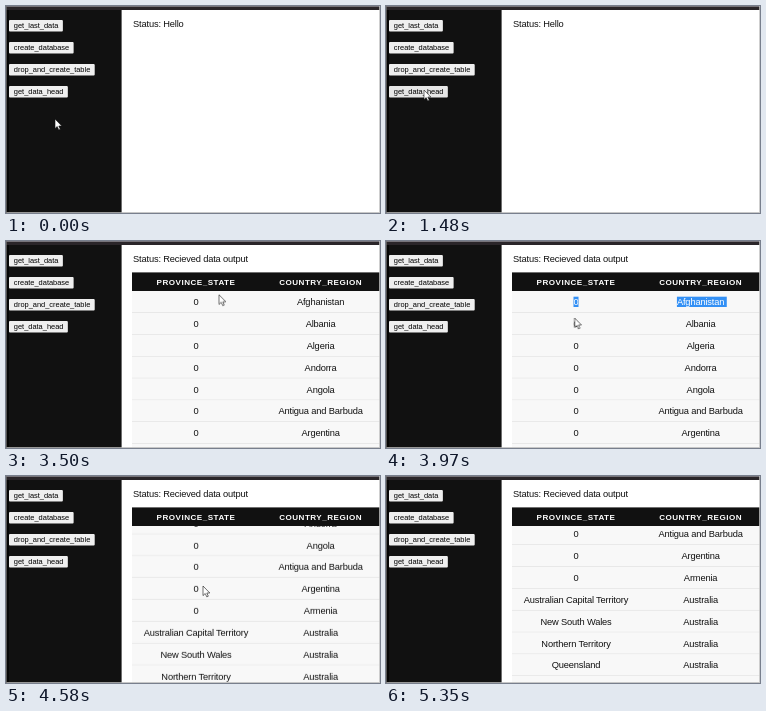
These frames come from a looping animation (374x207 px, 6.43 s). An HTML page:

```html
<!DOCTYPE html>
<html lang="en">
<head>
<meta charset="utf-8">
<title>Data table demo</title>
<style>
  html, body { margin: 0; width: 100%; height: 100%; overflow: hidden; background: #fff; }
  svg { display: block; width: 374px; height: 207px; }
  text { font: 9.3px "Liberation Sans", Arial, sans-serif; letter-spacing: -.16px; fill: #111; }
  .button text { font-size: 7.45px; letter-spacing: 0; fill: #000; }
  .button rect { fill: #efefef; }
  .head text { font-size: 8.1px; font-weight: bold; letter-spacing: .48px; fill: #fff; }
  .mid { text-anchor: middle; }
  .selected rect { fill: #3390f5; }
  .selected text { fill: #fff; }
</style>
</head>
<body>
<svg id="stage" viewBox="0 0 374 207">
  <defs><clipPath id="body"><rect x="126" y="50" width="248" height="157"/></clipPath></defs>
</svg>
<script>
const LOOP = 6430, TICK = 77.5, ROW = 21.83, COLUMNS = [190, 314.6];
const stage = document.getElementById('stage');

function add(parent, tag, attrs = {}, content = '') {
  const el = document.createElementNS('http://www.w3.org/2000/svg', tag);
  for (const key in attrs) el.setAttribute(key, attrs[key]);
  el.textContent = content;
  return parent.appendChild(el);
}
const box = (parent, x, y, width, height, fill = '') =>
  add(parent, 'rect', { x, y, width, height, ...(fill && { fill }) });
const label = (parent, x, y, content, cls = '') =>
  add(parent, 'text', { x, y, class: cls }, content);

// Holds each value until the next time.
function play(el, property, steps) {
  const easing = 'steps(1, end)';
  const frames = steps.map(([t, value]) => ({ offset: t / LOOP, [property]: value, easing }));
  frames.push({ offset: 1, [property]: steps[steps.length - 1][1] });
  el.animate(frames, { duration: LOOP, iterations: Infinity });
}
const show = (el, from) => play(el, 'opacity', [[0, 0], [from, 1]]);
const hide = (el, from) => play(el, 'opacity', [[0, 1], [from, 0]]);

// Samples valueAt(t) once per tick, as a screen recorder would.
function sample(first, last, valueAt) {
  const count = Math.round((last - first) / TICK);
  return Array.from({ length: count + 1 }, (_, i) => {
    const t = first + (last - first) * i / count;
    return [t, valueAt(t)];
  });
}
const progress = (t, start, end) => Math.min(1, Math.max(0, (t - start) / (end - start)));
const easeInOut = p => p * p / (p * p + (1 - p) * (1 - p));
const smooth = p => p * p * (3 - 2 * p);

// Page
box(stage, 0, 0, 374, 207, '#fff');
box(stage, 0, 0, 115.6, 207, '#111');
box(stage, 0, 4, 3, 203, '#050505');
box(stage, 0, 0, 374, 4, '#2a2529');
box(stage, 0, 0, 374, 1, '#77747a');

// Buttons
const names = ['get_last_data', 'create_database', 'drop_and_create_table', 'get_data_head'];
const faces = names.map((name, i) => {
  const g = add(stage, 'g', { class: 'button' });
  const face = add(g, 'rect', { x: 3, y: 14 + 22 * i, height: 11.6, rx: 1 });
  const text = label(g, 7.8, 22.3 + 22 * i, name);
  face.setAttribute('width', text.getComputedTextLength() + 9.2);
  return face;
});
play(faces[3], 'fill', [[0, '#efefef'], [155, '#e6e6e6'], [1330, '#f5f5f5'],
  [1480, '#e6e6e6'], [2970, '#efefef']]);

// Status
hide(label(stage, 127, 20.8, 'Status: Hello'), 2260);
show(label(stage, 127, 20.8, 'Status: Recieved data output'), 2260);

// Table
const table = add(stage, 'g');
show(table, 2260);
const rows = add(add(table, 'g', { 'clip-path': 'url(#body)' }), 'g');
const countries = ['Afghanistan', 'Albania', 'Algeria', 'Andorra', 'Angola',
  'Antigua and Barbuda', 'Argentina', 'Armenia'];
const states = ['Australian Capital Territory', 'New South Wales', 'Northern Territory',
  'Queensland', 'South Australia'];
const regions = [...countries.map(name => ['0', name]), ...states.map(name => [name, 'Australia'])];

regions.forEach((cells, i) => {
  const top = 50 + ROW * i;
  box(rows, 126, top, 248, ROW, '#f8f8f8');
  box(rows, 126, top + ROW - .5, 248, 1, '#dcdcdc');
  cells.forEach((cell, c) => label(rows, COLUMNS[c], top + 14.2, cell, 'mid'));
});

function select(i, from) {
  const g = add(rows, 'g', { class: 'selected' });
  const y = 50 + ROW * i;
  regions[i].forEach((cell, c) => {
    const face = box(g, 0, y + 5.7, 0, 10.3);
    const width = label(g, COLUMNS[c], y + 14.2, cell, 'mid').getComputedTextLength();
    face.setAttribute('x', COLUMNS[c] - width / 2);
    face.setAttribute('width', width + 2.5 * c);
  });
  show(g, from);
}
select(0, 3890);
select(1, 4045);

const scroll = sample(4420, 4730, t => -112 * easeInOut(progress(t, 4356, 4716)));
play(rows, 'transform', [[0, 0], ...scroll].map(([t, y]) => [t, `translateY(${y}px)`]));

const head = add(table, 'g', { class: 'head' });
box(head, 126, 31.4, 248, 18.6, '#111');
label(head, COLUMNS[0], 43.9, 'PROVINCE_STATE', 'mid');
label(head, COLUMNS[1], 43.9, 'COUNTRY_REGION', 'mid');

// Window edge
box(stage, 0, 206.2, 374, .8, '#bbb');
box(stage, 373.2, 0, .8, 207, '#c4c4c4');
box(stage, 0, 0, .7, 207, '#777');

// Pointer: each move runs from the previous point, optionally bowed downwards.
const pointer = add(stage, 'path', {
  d: 'M0 0V9.6L2.2 7.5L3.8 10.9L5.3 10.2L3.8 7H6.8Z',
  fill: '#fff', stroke: '#111', 'stroke-width': .6
});
const moves = [
  { first: 80, last: 230, x: 40, y: 83 },
  { first: 400, last: 470, x: 38, y: 84 },
  { first: 2890, last: 3500, x: 213, y: 53.7, bow: 15 },
  { first: 3580, last: 3815, x: 184, y: 59 },
  { first: 3890, last: 4200, x: 197, y: 110 },
  { first: 4960, last: 5350, x: 290, y: 208, ease: p => p ** 1.6 }
];
let at = { x: 49, y: 113 };
const place = (x, y) => `translate(${x}px, ${y}px)`;
const path = [[0, place(at.x, at.y)]];
for (const { first, last, x, y, bow = 0, ease = smooth } of moves) {
  const from = at;
  path.push(...sample(first, last, t => {
    const p = ease(progress(t, first - TICK, last));
    return place(from.x + (x - from.x) * p,
      from.y + (y - from.y) * p + bow * Math.sin(Math.PI * p));
  }));
  at = { x, y };
}
play(pointer, 'transform', path);
hide(pointer, 5350);
</script>
</body>
</html>
```
